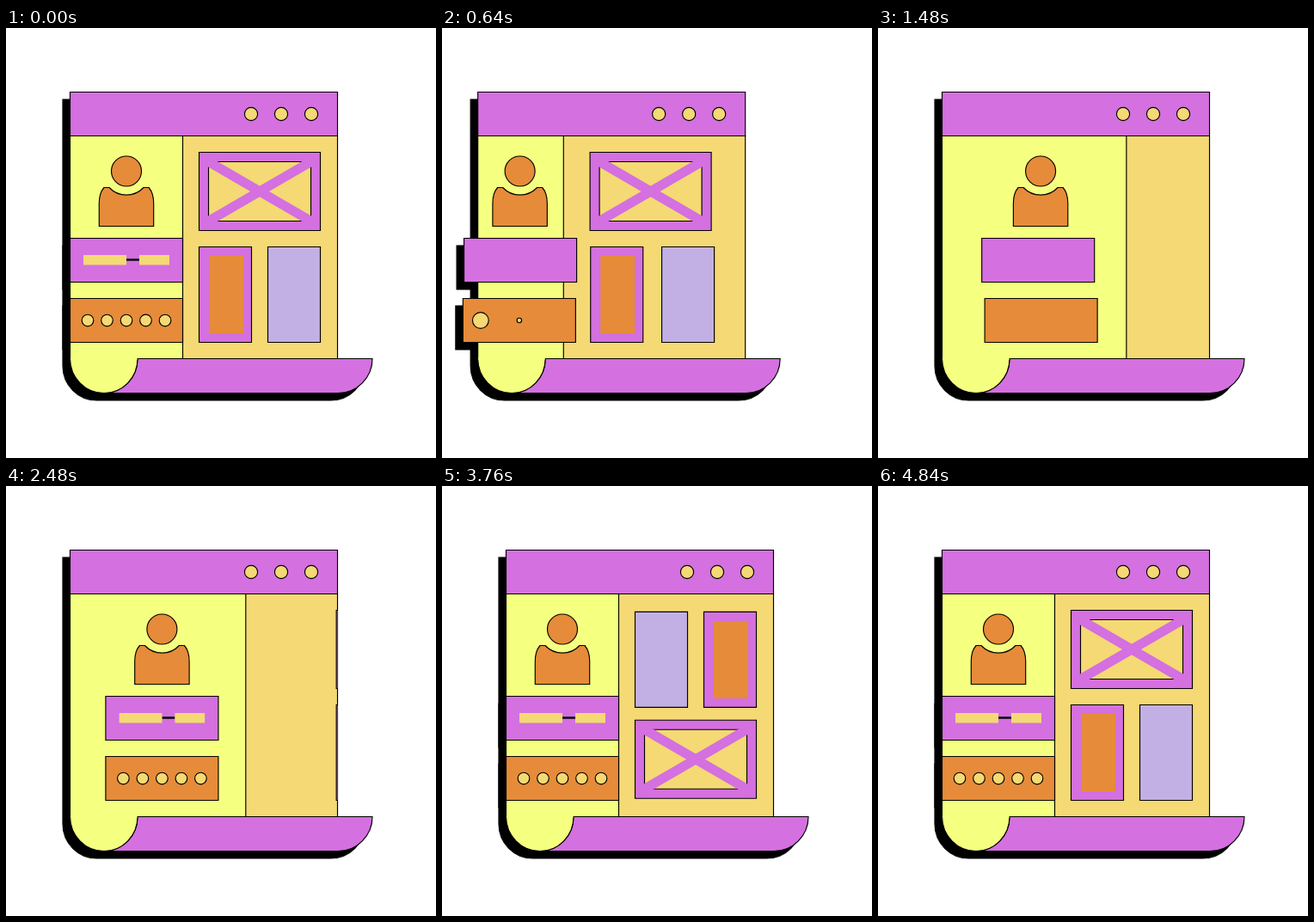
An HTML page with a canvas for the animation above (5000 ms loop, 500 by 500 pixels).

```html
<!DOCTYPE html>
<html>
<head>
<meta charset="utf-8">
<style>
  html, body { margin: 0; width: 100%; height: 100%; overflow: hidden; background: #fff; }
  canvas { display: block; }
</style>
</head>
<body>
<canvas id="stage" width="500" height="500"></canvas>
<script>
const ctx = document.getElementById('stage').getContext('2d');
const LOOP = 5000;
const PURPLE = '#d470df', YELLOW = '#f5ff80', SAND = '#f4d974',
      ORANGE = '#e68b39', LAVENDER = '#c2b0e4', BLACK = '#000';

const clamp = u => Math.max(0, Math.min(1, u));
const ease = u => u < .5 ? 4 * u ** 3 : 1 - 4 * (1 - u) ** 3;
const backIn = u => u * u * (5 * u - 4);

// Each key is [start, end, value]; the value is held until the next start.
function track(t, first, keys) {
  let value = first;
  for (const [start, end, next] of keys) {
    value += (next - value) * ease(clamp((t - start) / (end - start)));
  }
  return value;
}

function paint(fill, stroke = BLACK) {
  ctx.fillStyle = fill;
  ctx.fill();
  if (stroke) {
    ctx.strokeStyle = stroke;
    ctx.lineWidth = 1.15;
    ctx.stroke();
  }
}

function box(x, y, w, h, fill, stroke) {
  ctx.beginPath();
  ctx.rect(x, y, w, h);
  paint(fill, stroke);
}

function disc(x, y, r, fill) {
  ctx.beginPath();
  ctx.arc(x, y, r, 0, Math.PI * 2);
  paint(fill);
}

function line(x1, y1, x2, y2, color, width) {
  ctx.beginPath();
  ctx.moveTo(x1, y1);
  ctx.lineTo(x2, y2);
  ctx.strokeStyle = color;
  ctx.lineWidth = width;
  ctx.stroke();
}

function shifted(x, y, draw) {
  ctx.save();
  ctx.translate(x, y);
  draw();
  ctx.restore();
}

const silhouette = new Path2D(
  'M74.5 74.5H385.5V384.5H426A40 40 0 0 1 386 424.5H114A39.5 40 0 0 1 74.5 384.5Z');
const curl = new Path2D(
  'M74.5 384.5A39.5 40 0 0 0 114 424.5A39 40 0 0 0 153 384.5');
const roll = new Path2D(
  'M153 384.5H426A40 40 0 0 1 386 424.5H114A39 40 0 0 0 153 384.5Z');
const torso = new Path2D(
  'M108.3 230.5V204Q108.3 192 114 185.5H120A27.5 27.5 0 0 0 160 185.5H166Q171.7 192 171.7 204V230.5Z');

function paintPath(path, fill) {
  ctx.fillStyle = fill;
  ctx.fill(path);
  ctx.strokeStyle = BLACK;
  ctx.lineWidth = 1.15;
  ctx.stroke(path);
}

function picture() {
  box(224.5, 144.5, 141, 91, PURPLE);
  box(235.5, 155.5, 119, 69, SAND);
  line(233, 154, 357, 226, PURPLE, 11);
  line(357, 154, 233, 226, PURPLE, 11);
}

function framedCard() {
  box(224.5, 254.5, 61, 111, PURPLE);
  box(236, 265, 40, 90, ORANGE, null);
}

function plainCard() {
  box(304.5, 254.5, 61, 111, LAVENDER);
}

function textField(shown) {
  ctx.save();
  ctx.beginPath();
  ctx.rect(90, 260, 100 * shown, 20);
  ctx.clip();
  line(140, 269.5, 155, 269.5, BLACK, 2.4);
  box(90, 264, 50, 11.5, SAND, null);
  box(155, 264, 35, 11.5, SAND, null);
  ctx.restore();
}

const popOrder = [4, 1, 3, 0, 2];

function pins(t) {
  popOrder.forEach((order, i) => {
    const leave = backIn(clamp((t - order * 120) / 300));
    const enter = backIn(1 - clamp((t - 1680 - (4 - order) * 90) / 300));
    const size = 1 - (t < 1600 ? leave : enter);
    if (size > .01) disc(95 + i * 22.5, 340, 6.8 * size, SAND);
  });
}

function drawWindow(t) {
  const sidebar = track(t, 0, [[0, 500, -35], [550, 1050, 115], [1050, 1550, 83], [2327, 2827, 0]]);
  const item = (leave, settle) =>
    track(t, 0, [[0, 500, -17.5], [leave, leave + 500, 65], [settle, settle + 500, 41.5], [2440, 2930, 0]]);
  const profileX = item(570, 1197), nameX = item(560, 1165), pinsX = item(600, 1202);
  const content = leave =>
    track(t, 0, [[0, 500, -20], [leave, leave + 500, 172], [2350, 2850, 0]]);
  const swap = track(t, 0, [[2855, 3348, 1], [3841, 4334, 0]]);
  const flip = track(t, 0, [[3348, 3841, 1], [4334, 4827, 0]]);
  const edge = 205.5 + sidebar;

  // Hard shadow behind everything
  shifted(-8.5, 8.5, () => {
    paintPath(silhouette, BLACK);
    box(74.5 + nameX, 244.5, 131, 51, BLACK);
    box(74.5 + pinsX, 314.5, 131, 51, BLACK);
  });

  box(74.5, 125.5, 311, 259, SAND);
  ctx.save();
  ctx.beginPath();
  ctx.rect(74.5, 125.5, 311, 259);
  ctx.clip();
  shifted(content(600), 130 * flip, picture);
  shifted(content(585) + 80 * swap, -110 * flip, framedCard);
  shifted(content(555) - 80 * swap, -110 * flip, plainCard);
  ctx.restore();

  box(74.5, 125.5, edge - 74.5, 259, YELLOW);
  paintPath(roll, PURPLE);
  paintPath(curl, YELLOW);
  box(75.1, 383, 77.2, 3, YELLOW, null);
  box(74.5, 74.5, 311, 51, PURPLE);
  for (const x of [285, 320, 355]) disc(x, 100, 7.6, SAND);

  shifted(profileX, 0, () => {
    disc(140, 166.5, 17.5, ORANGE);
    paintPath(torso, ORANGE);
  });
  shifted(nameX, 0, () => {
    box(74.5, 244.5, 131, 51, PURPLE);
    textField(track(t, 1, [[40, 480, 0], [1700, 2200, 1]]));
  });
  shifted(pinsX, 0, () => {
    box(74.5, 314.5, 131, 51, ORANGE);
    pins(t);
  });
}

function frame(now) {
  const t = now % LOOP;
  ctx.fillStyle = '#fff';
  ctx.fillRect(0, 0, 500, 500);
  const slide = track(t, 0, [[0, 500, -40], [500, 1000, 40], [1000, 1500, 0]]);
  shifted(slide, 0, () => drawWindow(t));
  requestAnimationFrame(frame);
}
requestAnimationFrame(frame);
</script>
</body>
</html>
```
